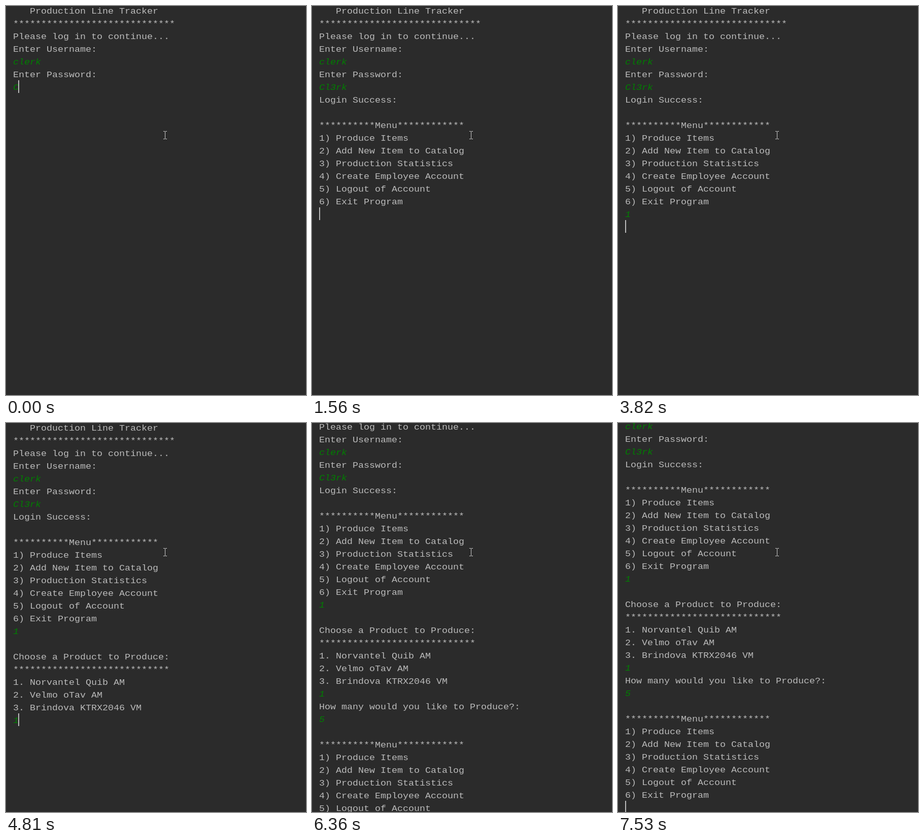
These frames come from a looping animation (591 px wide and 765 px high, 7990 ms). An HTML page:

```html
<!DOCTYPE html>
<html lang="en">
<head>
<meta charset="utf-8">
<title>Production Line Tracker</title>
<style>
  html, body { margin: 0; width: 100%; height: 100%; overflow: hidden; background: #2b2b2b; }
  #console { position: absolute; left: 0; top: -4px; }
  /* Low, wide letters: 29px lines flattened to a 25px pitch. */
  pre {
    position: absolute; left: 14px; top: 0; margin: 0;
    font: 18.33px/29px "Liberation Mono", "Courier New", monospace;
    color: #bbb;
    transform: translateY(2.6px) scaleY(calc(25 / 29));
    transform-origin: 0 0;
  }
  pre i { color: #007f00; }
  #caret { position: absolute; width: 2px; height: 25px; background: #bbb; }
  #mouse { position: absolute; left: 309px; top: 245px; }
</style>
</head>
<body>
<div id="console"><pre id="text"></pre><div id="caret"></div></div>
<svg id="mouse" width="9" height="18" fill="none" stroke="#d0d0d0">
  <path d="M1 1.5H4M5 1.5H8M4.5 2V16M1 16.5H4M5 16.5H8"/>
</svg>
<script>
const LOOP = 7990, LINE = 25, CHAR = 10.98;
const stars = n => '*'.repeat(n);

const menu = `
${stars(10)}Menu${stars(12)}
1) Produce Items
2) Add New Item to Catalog
3) Production Statistics
4) Create Employee Account
5) Logout of Account
6) Exit Program
`;
const intro = `   Production Line Tracker
${stars(29)}
Please log in to continue...
Enter Username:
`;
const products = `
Choose a Product to Produce:
${stars(28)}
1. Norvantel Quib AM
2. Velmo oTav AM
3. Brindova KTRX2046 VM
`;

const print = s => ({ out: s });
const type = s => ({ out: s, typed: true });
const caret = on => ({ caret: on });
const scroll = y => ({ scroll: y });

const events = [
  [0, print(intro), type('clerk\n'), print('Enter Password:\n'), type('C')],
  [410, type('l')],
  [550, type('3')],
  [860, type('r')],
  [1010, type('k')],
  [1440, type('\n')],
  [1560, print('Login Success:\n' + menu)],
  [2610, caret(false)],
  [3080, caret(true)],
  [3230, type('1')],
  [3820, type('\n')],
  [4070, print(products)],
  [4810, type('1')],
  [5220, type('\n')],
  [5370, print('How many would you like to Produce?:\n')],
  [5650, type('5')],
  [6080, type('\n')],
  [6360, print(menu), scroll(52)],
  [6510, scroll(103)],
  [7100, caret(false)],
  [7530, caret(true)]
];

const $ = id => document.getElementById(id);
let shown = -1;

function render(count) {
  const state = { caret: true, scroll: 0 };
  let html = '', plain = '';
  for (const [, ...actions] of events.slice(0, count)) {
    for (const { out = '', typed, ...change } of actions) {
      plain += out;
      html += typed ? `<i>${out}</i>` : out;
      Object.assign(state, change);
    }
  }
  const lines = plain.split('\n');
  const col = lines[lines.length - 1].length;
  $('text').innerHTML = html;
  $('console').style.transform = `translateY(${-state.scroll}px)`;
  Object.assign($('caret').style, {
    left: 14 + Math.floor(CHAR * col) + 'px',
    top: (lines.length - 1) * LINE + 'px',
    visibility: state.caret ? 'visible' : 'hidden'
  });
}

function tick() {
  const t = performance.now() % LOOP;
  const count = events.filter(([at]) => at <= t).length;
  if (count !== shown) render(shown = count);
  requestAnimationFrame(tick);
}
tick();
</script>
</body>
</html>
```
